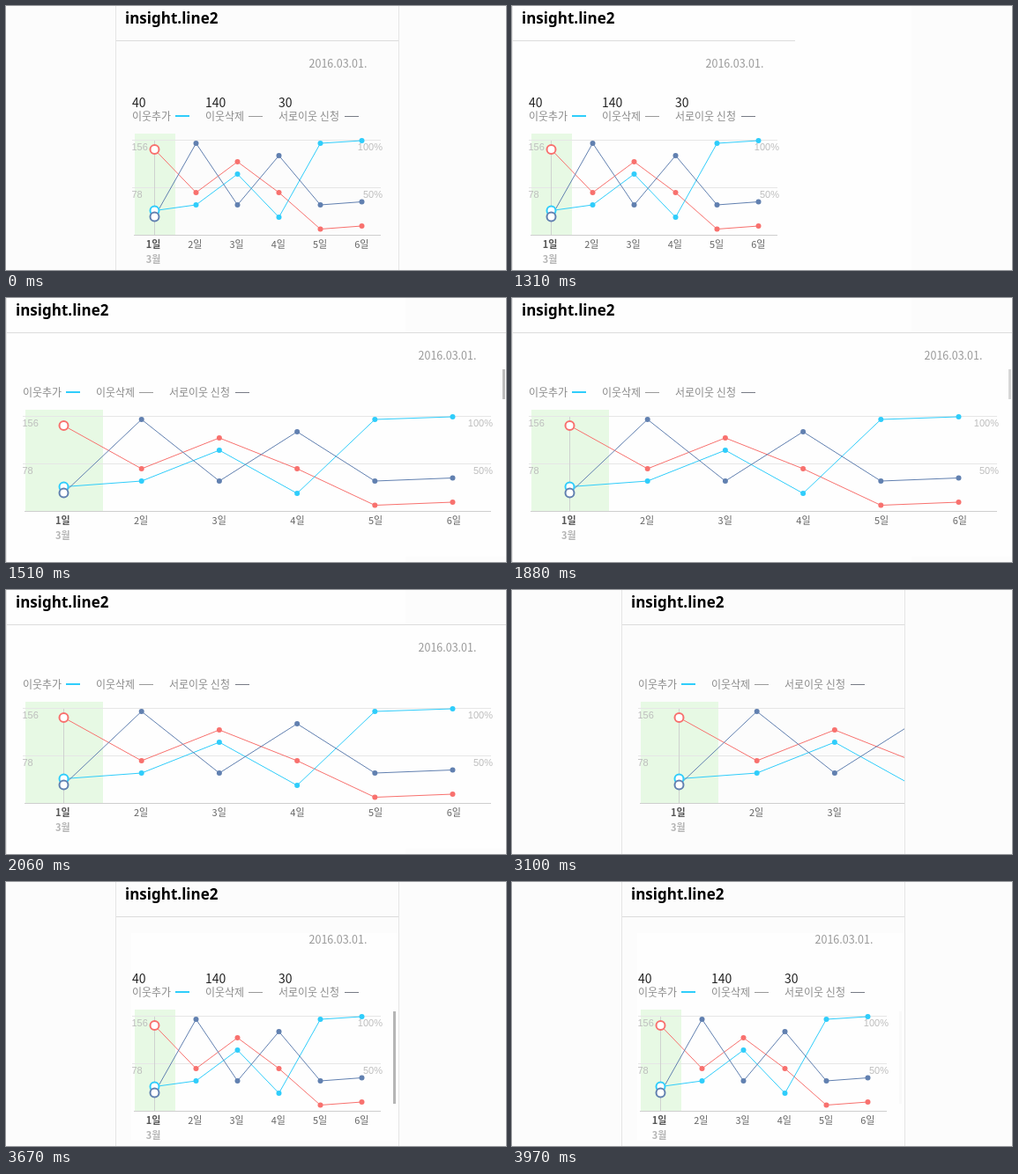
An HTML page with a canvas for the animation above (4.19 s loop, 567 px wide and 300 px high).

```html
<!DOCTYPE html>
<html lang="ko">
<head>
<meta charset="utf-8">
<title>insight.line2</title>
<style>
html, body { margin: 0; width: 100%; height: 100%; overflow: hidden; background: #fcfcfc; }
canvas { display: block; width: 567px; height: 300px; }
</style>
</head>
<body>
<canvas id="stage" width="567" height="300"></canvas>
<script>
const ctx = document.getElementById('stage').getContext('2d');
const W = 567, H = 300, LOOP = 4190;
const KR = '"Noto Sans CJK KR", "Noto Sans CJK", sans-serif';
const NUM = '"Liberation Sans", Arial, sans-serif';
const HEAD = '"Noto Sans", "Open Sans", sans-serif';

const series = [
  { color: '#f8716e', y: [163, 212, 177, 212, 253.5, 250] },
  { color: '#2fcdfb', y: [232.5, 226, 191, 240, 156, 153] },
  { color: '#6180b0', y: [239.5, 156, 226, 170, 226, 222.5] }
];
const legend = [
  { x: 19, name: '이웃추가', total: '40', key: 68, color: '#2fcdfb', weight: 2 },
  { x: 102, name: '이웃삭제', total: '140', key: 151, color: '#9a9a9a', weight: 1 },
  { x: 185, name: '서로이웃 신청', total: '30', key: 260, color: '#777b85', weight: 1 }
];

// Horizontal metrics, relative to the page's left edge.
const narrow = { first: 44.5, step: 47, band: 46, end: 301, label: 43, labelStep: 47.25, date: 219.5 };
const wide = { first: 65.5, step: 88.2, band: 88, end: 550, label: 64.3, labelStep: 88.7, date: 467.5 };

function box(x, y, w, h, color) {
  ctx.fillStyle = color;
  ctx.fillRect(x, y, w, h);
}

function text(str, x, y, font, color, align = 'left') {
  ctx.font = font;
  ctx.fillStyle = color;
  ctx.textAlign = align;
  ctx.fillText(str, x, y);
}

function dot(x, y, color, big) {
  ctx.beginPath();
  ctx.arc(x, y, big ? 5 : 3, 0, Math.PI * 2);
  ctx.fillStyle = big ? '#fff' : color;
  ctx.fill();
  if (!big) return;
  ctx.strokeStyle = color;
  ctx.lineWidth = 2;
  ctx.stroke();
}

function drawChart(m, dy, cursor) {
  box(22, 145 + dy, m.band, 115, '#e7f9e4');
  box(19, 152 + dy, m.end - 19, 1, '#e6e6e6');
  box(19, 206 + dy, m.end - 19, 1, '#e6e6e6');
  box(21, 260 + dy, m.end - 21, 1, '#cfcfcf');
  if (cursor) box(m.first - 0.5, 153 + dy, 1, 107, '#cfd2cf');

  for (const s of series) {
    ctx.beginPath();
    s.y.forEach((y, i) => ctx.lineTo(m.first + i * m.step, y + dy));
    ctx.strokeStyle = s.color;
    ctx.lineWidth = 1;
    ctx.stroke();
  }
  for (const s of series) {
    s.y.forEach((y, i) => dot(m.first + i * m.step, y + dy, s.color, i === 0));
  }
}

function drawLabels(m, dy) {
  const scale = '11px ' + NUM, gray = '#bdbdbd';
  text('156', 18.5, 164 + dy, scale, gray);
  text('78', 18.5, 218 + dy, scale, gray);
  text('100%', m.end + 2, 164 + dy, scale, gray, 'right');
  text('50%', m.end + 2, 218 + dy, scale, gray, 'right');
  for (let i = 0; i < 6; i++) {
    const font = (i ? '' : 'bold ') + '11px ' + KR;
    text(i + 1 + '일', m.label + i * m.labelStep, 275 + dy, font, i ? '#666' : '#555', 'center');
  }
  text('3월', m.label, 292 + dy, 'bold 11px ' + KR, '#b4b4b4', 'center');
}

function drawLegend(dy, totals) {
  for (const l of legend) {
    if (totals) text(l.total, l.x, 115, '14px ' + KR, '#222');
    text(l.name, l.x, 130 + dy, '12px ' + KR, '#8c8c8c');
    box(l.key, 126 - l.weight + dy, 16, l.weight, l.color);
  }
}

function stateAt(t) {
  const s = { framed: true, chart: narrow, labels: narrow, date: true, cursor: true, panel: false, thumb: 0 };
  if (t < 1310) return s;
  if (t < 3100) {
    s.framed = false;
    if (t < 1400) return s;
    s.labels = wide;
    if (t >= 1510) s.chart = wide;
    s.cursor = t < 1510 || t >= 1880;
    s.thumb = t < 1880 ? 1 : t < 1970 ? 0.6 : t < 2060 ? 0.25 : 0;
    return s;
  }
  if (t < 3150) return Object.assign(s, { chart: wide, labels: wide, date: false });
  s.panel = true;
  if (t < 3210) s.chart = wide;
  s.cursor = t < 3210 || t >= 3670;
  s.thumb = t < 3810 ? 1 : t < 3890 ? 0.6 : t < 3970 ? 0.25 : 0.07;
  return s;
}

function draw(t) {
  const s = stateAt(t);
  const landscape = s.labels === wide;
  const dy = landscape ? -18 : 0;

  box(0, 0, W, H, '#fcfcfc');
  if (!s.framed) {
    box(0, 0, 453, H, '#fefefe');
    if (landscape) box(453, 40, 114, 254, '#fefefe');
  }

  ctx.save();
  if (s.framed) {
    ctx.beginPath();
    ctx.rect(124, 0, 322, H);
    ctx.clip();
    ctx.translate(124, 0);
  }
  if (s.panel) box(18, 58, 303, 236, '#fefefe');
  text('insight.line2', 11, 20, 'bold 17px ' + HEAD, '#000');
  box(0, 39, !s.framed && landscape ? W : 321, 1, '#dcdcdc');
  if (s.date) text('2016.03.01.', s.labels.date, 70, '12.5px ' + KR, '#999');
  drawLegend(dy, !landscape);
  drawChart(s.chart, dy, s.cursor);
  drawLabels(s.labels, dy);
  box(0, 0, 1, H, '#e5e5e5');
  if (s.framed) box(321, 0, 1, H, '#e5e5e5');
  ctx.restore();

  if (s.thumb) {
    ctx.globalAlpha = s.thumb;
    if (s.framed) box(439, 147, 3, 105, '#b5b5b5');
    else box(563, 81, 3, 34, '#bcbcbc');
    ctx.globalAlpha = 1;
  }
}

const start = performance.now();
function tick() {
  draw((performance.now() - start) % LOOP);
  requestAnimationFrame(tick);
}
tick();
</script>
</body>
</html>
```
